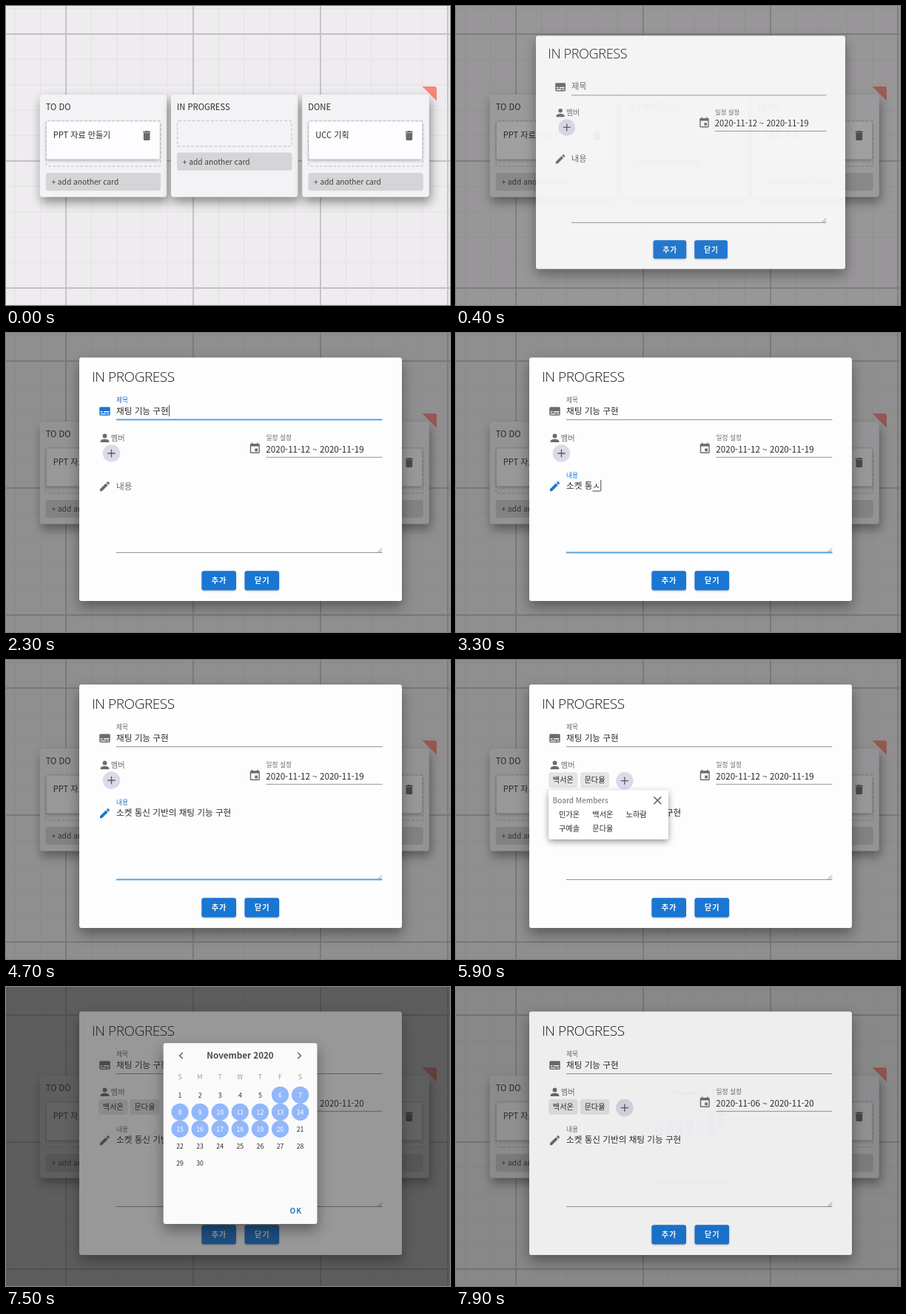
Write an HTML page that moves like this. It is 600x405 px and loops after 8 s.

```html
<!DOCTYPE html>
<html lang="ko">
<head>
<meta charset="utf-8">
<title>Board</title>
<style>
  html, body { margin: 0; width: 100%; height: 100%; overflow: hidden; background: #eeecee; }
  svg { display: block; }
  text { font-family: "Noto Sans CJK KR", "Noto Sans KR", "Noto Sans CJK JP", "Noto Sans CJK", sans-serif; fill: #2b2b2b; white-space: pre; }
  .column { filter: drop-shadow(2px 7px 7px rgba(0, 0, 0, .42)); }
  .card { filter: drop-shadow(0 2px 2px rgba(0, 0, 0, .28)); }
  .slot { fill: none; stroke: #cfcdd0; stroke-width: 1.4; stroke-dasharray: 4 2.2; }
  .sheet { filter: drop-shadow(0 8px 9px rgba(0, 0, 0, .38)); }
  .popup { filter: drop-shadow(0 3px 4px rgba(0, 0, 0, .4)); }
  .button { fill: #1976d2; filter: drop-shadow(0 1.5px 1px rgba(0, 0, 0, .25)); }
  .heading { font-family: "Open Sans", "Noto Sans", sans-serif; font-weight: 300; letter-spacing: -.45px; fill: #1c1c1c; }
  .icon { fill: #6b6b6b; }
  .muted { fill: #6b6b6b; }
  .line { fill: #949494; }
  .focused .icon, .focused .label { fill: #1976d2; }
  .focused .line { fill: #56a2e0; }
  .stroke { fill: none; stroke: #5c5c5c; stroke-width: 1.4; }
  .mid { text-anchor: middle; }
  .white { fill: #fff; }
</style>
</head>
<body>
<svg id="stage" width="600" height="405" viewBox="0 0 600 405"></svg>
<script>
const ICONS = {
  trash: 'M19,4H15.5L14.5,3H9.5L8.5,4H5V6H19M6,19A2,2 0 0,0 8,21H16A2,2 0 0,0 18,19V7H6Z',
  subtitles: 'M20,4H4A2,2 0 0,0 2,6V18A2,2 0 0,0 4,20H20A2,2 0 0,0 22,18V6A2,2 0 0,0 20,4M4,12H8V14H4V12M14,18H4V16H14V18M20,18H16V16H20V18M20,14H10V12H20V14Z',
  person: 'M12,4A4,4 0 0,1 12,12A4,4 0 0,1 12,4M12,14C16.42,14 20,15.79 20,18V20H4V18C4,15.79 7.58,14 12,14Z',
  calendar: 'M19,19H5V8H19M16,1V3H8V1H6V3H5C3.89,3 3,3.89 3,5V19A2,2 0 0,0 5,21H19A2,2 0 0,0 21,19V5C21,3.89 20.1,3 19,3H18V1M17,12H12V17H17V12Z',
  pencil: 'M20.71,7.04C21.1,6.65 21.1,6 20.71,5.63L18.37,3.29C18,2.9 17.35,2.9 16.96,3.29L15.12,5.12L18.87,8.87M3,17.25V21H6.75L17.81,9.93L14.06,6.18Z'
};
const BODY = 11.63, SMALL = 10.17, TINY = 8.72;
const MEMBERS = ['민가온', '백서온', '노하람', '구예솔', '문다율'];
const CHIPS = [MEMBERS[1], MEMBERS[4]];

const rect = (x, y, w, h, fill, extra = '') =>
  `<rect x="${x}" y="${y}" width="${w}" height="${h}" fill="${fill}" ${extra}/>`;
const text = (x, y, size, str, extra = '') =>
  `<text x="${x}" y="${y}" font-size="${size}" ${extra}>${str}</text>`;
const icon = (name, x, y) =>
  `<path class="icon" d="${ICONS[name]}" transform="translate(${x - 8.72} ${y - 8.72}) scale(.7267)"/>`;

function grid(step, x0, y0, color, width) {
  let d = '';
  for (let x = x0; x < 600; x += step) d += `M${x} 0V405`;
  for (let y = y0; y < 405; y += step) d += `M0 ${y}H600`;
  return `<path d="${d}" stroke="${color}" stroke-width="${width}"/>`;
}

function column(x, name, card) {
  const slot = card ? 62 : 35, buttonY = card ? 226 : 198.5;
  return rect(x, 120, 171.5, 138.7, '#f3f2f5', 'rx="4" class="column"') +
    text(x + 8, 140.8, 11.19, name) +
    `<rect class="slot" x="${x + 8.5}" y="155.5" width="154.5" height="${slot - .5}" rx="2"/>` +
    (card ? rect(x + 9, 156.8, 153, 50.7, '#fdfcfe', 'rx="2" class="card"') +
      text(x + 18, 178.6, 11.1, card) + icon('trash', x + 144.5, 175.5) : '') +
    rect(x + 8, buttonY, 155.5, 24.3, '#d5d4d6', 'rx="3.5"') +
    text(x + 15.7, buttonY + 16, SMALL, '+ add another card', 'fill-opacity=".88"');
}

const field = (id, name, iconName, iconY, lineY) => `<g id="${id}">
  ${icon(iconName, 133.5, iconY)}
  <text class="label muted" font-size="${BODY}">${name}</text>
  <text class="value" x="149" font-size="${BODY}"></text>
  <rect class="caret" width=".9" height="15" fill="#333"/>
  <rect class="compose" height=".9" fill="#333"/>
  <rect class="line" x="149" y="${lineY}" width="359.5" height="1"/></g>`;

const button = (x, name) => rect(x, 322.3, 46.6, 26.3, '#1976d2', 'rx="3" class="button"') +
  text(x + 23.7, 339.4, SMALL, name, 'class="mid white" font-weight="700" letter-spacing=".9"');

const chip = (name, i) => `<g id="chip${i}">` +
  rect(125 + i * 42.7, 152, 39.5, 21, '#e5e4e6', 'rx="4"') +
  text(130.8 + i * 42.7, 166.2, SMALL, name) + '</g>';

const popup = `<g id="popup">${rect(125, 176.3, 162, 66.7, '#fff', 'rx="3" class="popup"')}
  ${text(130.5, 193.7, SMALL, 'Board Members', 'class="muted"')}
  <path class="stroke" stroke-width="1.2" d="M267.3 185.2L277.3 195.2M277.3 185.2L267.3 195.2"/>
  ${MEMBERS.map((m, i) => text(139 + i % 3 * 45.3, i < 3 ? 212.8 : 232, SMALL, m, 'font-weight="500"')).join('')}</g>`;

const dialog = `<g id="dialog">
  ${rect(99, 33.3, 436, 329.7, '#fefdfe', 'rx="3" class="sheet"')}
  ${text(116, 65.5, 19, 'IN PROGRESS', 'class="heading"')}
  ${field('subject', '제목', 'subtitles', 106, 117)}
  ${icon('person', 133.5, 142.3)}
  ${text(141.8, 145.6, SMALL, '멤버', 'class="muted"')}
  ${CHIPS.map(chip).join('')}
  <g id="plus"><circle cx="142.5" cy="163" r="11.8" fill="#dbdaeb"/>
    <path class="stroke" d="M137.3 163H147.7M142.5 157.8V168.2"/></g>
  ${icon('calendar', 336.3, 156.5)}
  ${text(351.5, 145.2, TINY, '일정 설정', 'class="muted"')}
  <text id="dates" x="351.3" y="161.6" font-size="${BODY}"></text>
  ${rect(351.5, 167.8, 157, 1, '#949494')}
  ${field('content', '내용', 'pencil', 207.7, 297)}
  <path d="M502.5 297L508 291.5M505.5 297L508 294.5" stroke="#777" stroke-width=".8"/>
  ${button(264.4, '추가')}${button(322.5, '닫기')}
  ${popup}</g>`;

function days() {
  let out = '';
  for (let d = 1; d <= 30; d++) {
    const x = 235 + (d - 1) % 7 * 27.1, y = 146.3 + Math.floor((d - 1) / 7) * 23;
    out += `<g class="day"><circle cx="${x}" cy="${y}" r="11.6" fill="#92b7fa"/>` +
      text(x, y + 3.3, TINY, d, 'class="mid" font-weight="500"') + '</g>';
  }
  return out;
}

const picker = `<g id="picker">
  ${rect(212.7, 76, 207.8, 245, '#fbfafb', 'rx="3" class="sheet"')}
  <g id="prevFocus"><circle cx="236.7" cy="93" r="12.5" fill="#dddcdd"/>
    <rect x="223.8" y="80.3" width="26" height="25.6" rx="1" fill="none" stroke="#1d1a1d" stroke-width="1.6"/></g>
  <path class="stroke" d="M238.8 88.8L234.6 93L238.8 97.2M394.2 88.8L398.4 93L394.2 97.2"/>
  ${text(316.5, 97.3, BODY, 'November 2020', 'class="mid" font-weight="700" fill-opacity=".85"')}
  ${[...'SMTWTFS'].map((s, i) => text(235 + i * 27.1, 125.3, TINY, s, 'class="mid" font-weight="500" fill-opacity=".45"')).join('')}
  ${days()}
  ${text(391.8, 306.6, SMALL, 'OK', 'class="mid" font-weight="700" letter-spacing=".9" style="fill:#2b7ccb"')}</g>`;

const dim = id => rect(0, 0, 600, 405, '#212121', `id="${id}"`);

document.getElementById('stage').innerHTML =
  rect(0, 0, 600, 405, '#eeecee') +
  grid(34.4, 12.2, 3.6, '#e4e2e4', 1) + grid(172, 81, 38, '#c2c0c2', 1.8) +
  '<path d="M562.5 109H579.5Q582 109 582 111.5V128.5Z" fill="#f9857b"/>' +
  column(45.7, 'TO DO', 'PPT 자료 만들기') + column(223, 'IN PROGRESS') + column(400.3, 'DONE', 'UCC 기획') +
  dim('dialogDim') + dialog + dim('pickerDim') + picker;

const $ = id => document.getElementById(id);
const dayNodes = [...document.querySelectorAll('.day')];

// One typing step per 100 ms, including half-composed syllables.
const SUBJECT = ['ㅊ', '채', '채티', '채팅', '채팅 기', '채팅 기느', '채팅 기능 ', '채팅 기능 구혀', '채팅 기능 구현'];
const CONTENT = ['소', '소켓', '소켓 토', '소켓 통ㅅ', '소켓 통시', '소켓 통신 ㄱ', '소켓 통신 기바', '소켓 통신 기반으',
  ...['', ' ㅊ', ' 채티', ' 채팅', ' 채팅 기', ' 채팅 기느', ' 채팅 기능 구ㅎ', ' 채팅 기능 구현'].map(s => '소켓 통신 기반의' + s)];

const clamp = x => Math.max(0, Math.min(1, x));

// cubic-bezier(.25, .8, .25, 1)
function ease(x) {
  if (x <= 0 || x >= 1) return clamp(x);
  let lo = 0, hi = 1, u;
  for (let i = 0; i < 20; i++) {
    u = (lo + hi) / 2;
    const v = 1 - u;
    if (.75 * v * v * u + .75 * v * u * u + u ** 3 < x) lo = u; else hi = u;
  }
  return 2.4 * (1 - u) ** 2 * u + 3 * (1 - u) * u * u + u ** 3;
}

const shown = (t, from, to = Infinity, ms = 300) =>
  t < to ? ease((t - from) / ms) : 1 - ease((t - to) / ms);
const show = (node, on) => node.setAttribute('display', on ? 'inline' : 'none');

function pop(node, p) {
  show(node, p > 0);
  node.setAttribute('opacity', p);
  node.setAttribute('transform', `translate(317 198) scale(${.5 + p / 2}) translate(-317 -198)`);
}

function drawField(id, t, { focus, blur, start, steps, restY, floatY, textY, lineY, composing }) {
  const node = $(id), part = c => node.querySelector('.' + c);
  const active = t >= focus && t < blur;
  const i = Math.min(Math.floor((t - start) / 100), steps.length - 1);
  const str = i < 0 ? '' : steps[i];
  const up = ease((t - focus) / 250);
  const value = part('value'), caret = part('caret'), compose = part('compose'), line = part('line');
  node.setAttribute('class', active ? 'focused' : '');
  part('label').setAttribute('transform',
    `translate(149 ${restY + (floatY - restY) * up}) scale(${1 - .25 * up})`);
  value.setAttribute('y', textY);
  value.textContent = str;
  const width = str ? value.getComputedTextLength() : 0;
  caret.setAttribute('x', 149.3 + width);
  caret.setAttribute('y', textY - 12);
  show(caret, active && !(t >= start + 1700));
  compose.setAttribute('x', 149 + width - 10.7);
  compose.setAttribute('y', textY + 2.4);
  compose.setAttribute('width', 10.7);
  show(compose, composing && active && str && i < steps.length - 1);
  line.setAttribute('y', active ? lineY - .6 : lineY);
  line.setAttribute('height', active ? 2 : 1);
}

function draw(t) {
  const open = shown(t, 262), pick = shown(t, 6330, 7790);
  $('dialogDim').setAttribute('opacity', .46 * open);
  pop($('dialog'), open);
  $('pickerDim').setAttribute('opacity', .46 * pick);
  pop($('picker'), shown(t, 6330, 7720));

  drawField('subject', t, { focus: 1000, blur: 2400, start: 1100, steps: SUBJECT,
    restY: 109.8, floatY: 94, textY: 109.8, lineY: 117 });
  drawField('content', t, { focus: 2400, blur: 5100, start: 3000, steps: CONTENT,
    restY: 212, floatY: 195.6, textY: 211.2, lineY: 297, composing: true });

  const chips = (t >= 5600) + (t >= 5800);
  CHIPS.forEach((_, i) => show($('chip' + i), i < chips));
  $('plus').setAttribute('transform', `translate(${chips * 42.7} ${chips ? .6 : 0})`);
  $('popup').setAttribute('opacity', shown(t, 5360, 6330, 150));

  const [first, last] = t < 7000 ? [12, 19] : t < 7300 ? [6, 6] : [6, 20];
  const date = d => '2020-11-' + String(d).padStart(2, '0');
  $('dates').textContent = first === last ? date(first) : `${date(first)} ~ ${date(last)}`;
  show($('prevFocus'), t < 7000);
  dayNodes.forEach((node, i) => {
    const on = i + 1 >= first && i + 1 <= last;
    show(node.firstChild, on);
    node.lastChild.style.fill = on ? '#fff' : '';
  });
}

const began = performance.now();
function tick() {
  const t = Math.floor((performance.now() - began + 30) / 100) * 100 % 8000;
  draw(t);
  requestAnimationFrame(tick);
}
tick();
</script>
</body>
</html>
```
